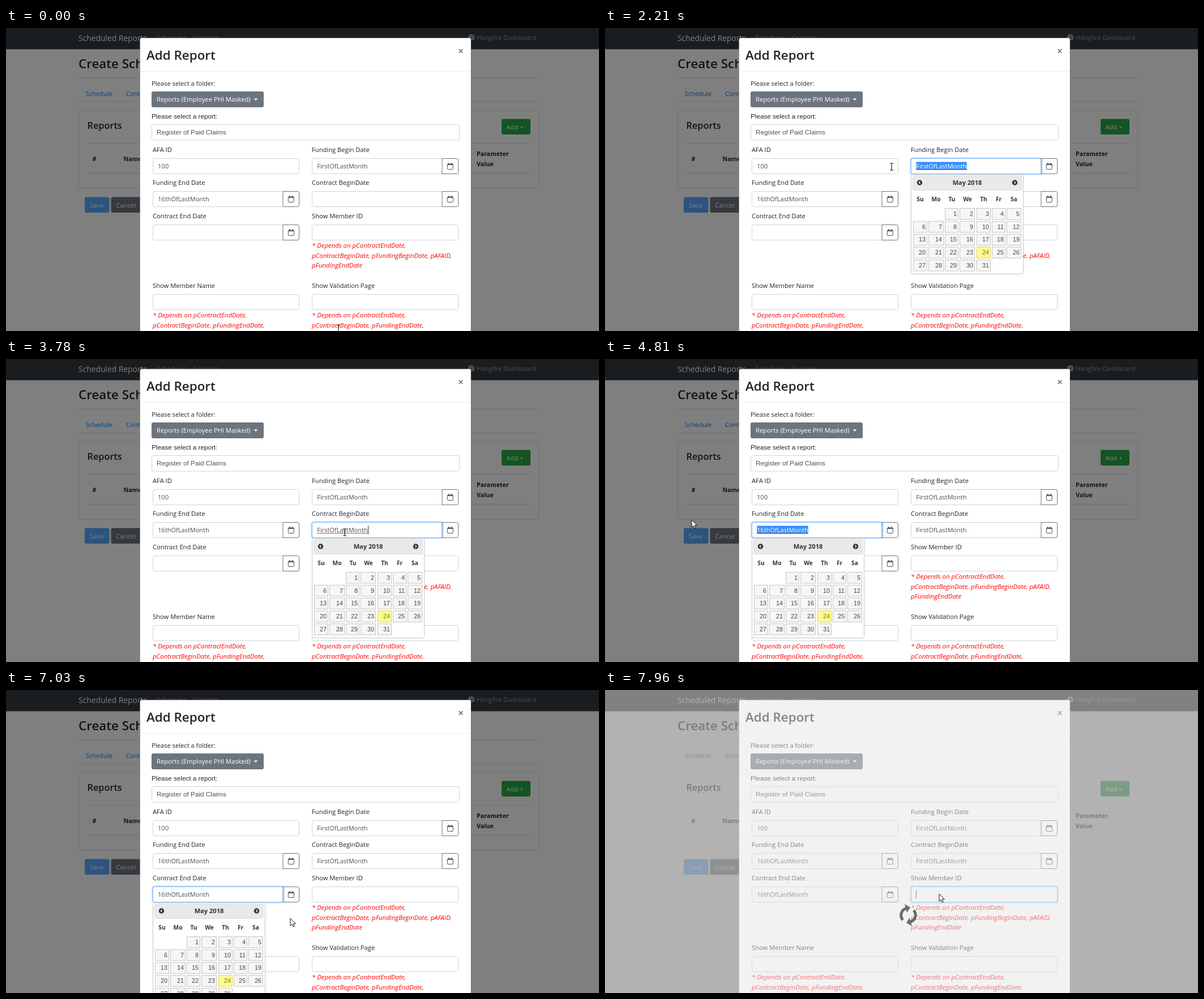
An HTML page for the animation above (8000 ms loop, 1047 px wide and 535 px high).

```html
<!DOCTYPE html>
<html lang="en">
<head>
<meta charset="utf-8">
<title>Add Report</title>
<style>
  html, body { margin: 0; width: 100%; height: 100%; overflow: hidden; background: #808080; }
  svg { display: block; }
  text { font-family: "Open Sans", "Noto Sans", sans-serif; white-space: pre; }
  .arial { font-family: "Liberation Sans", Arial, sans-serif; }
</style>
</head>
<body>
<svg id="stage" width="1047" height="535" viewBox="0 0 1047 535" xmlns="http://www.w3.org/2000/svg"></svg>
<script>
const LOOP = 8000;
const stage = document.getElementById('stage');

// ---- markup helpers ----
const rect = (x, y, w, h, fill, stroke = 'none', r = 0, extra = '') =>
  `<rect x="${x}" y="${y}" width="${w}" height="${h}" rx="${r}" fill="${fill}" stroke="${stroke}" ${extra}/>`;
const text = (x, y, size, fill, content, extra = '') =>
  `<text x="${x}" y="${y}" font-size="${size}" fill="${fill}" ${extra}>${content}</text>`;
const hline = (x1, x2, y, color, width = 1) =>
  `<path d="M${x1} ${y}H${x2}" stroke="${color}" stroke-width="${width}"/>`;
const BOLD = 'font-weight="700"', SEMI = 'font-weight="600"', MIDDLE = 'text-anchor="middle"';
const INK = '#212529', FIELD_INK = '#495057';

// ---- form fields ----
const fields = {
  afa: { x: 259, y: 230, label: 'AFA ID', value: '100' },
  fundBegin: { x: 540, y: 230, label: 'Funding Begin Date', value: 'FirstOfLastMonth', date: true },
  fundEnd: { x: 259, y: 288, label: 'Funding End Date', value: '16thOfLastMonth', date: true },
  contractBegin: { x: 540, y: 288, label: 'Contract BeginDate', value: 'FirstOfLastMonth', date: true, pasteAt: 3780 },
  contractEnd: { x: 259, y: 347, label: 'Contract End Date', value: '16thOfLastMonth', date: true, pasteAt: 6680 },
  memberId: { x: 540, y: 347, label: 'Show Member ID' },
  memberName: { x: 259, y: 470, label: 'Show Member Name' },
  validation: { x: 540, y: 470, label: 'Show Validation Page' }
};
const inputWidth = f => f.date ? 230 : 258;

const calendarIcon = (x, y) =>
  `<g transform="translate(${x} ${y})" fill="none" stroke="${FIELD_INK}">` +
  rect(-5, -4, 10, 9.5, 'none', FIELD_INK, 1) +
  `<path d="M-5 -2.7H5" stroke-width="1.4"/><path d="M-2.5 -6V-3M2.5 -6V-3" stroke-width="1.5"/></g>`;

const fieldMarkup = ([id, f]) =>
  text(f.x, f.y - 11, 11.2, INK, f.label) +
  rect(f.x + .5, f.y + .5, 258, 27, '#fff', '#ced4da', 3) +
  (f.date
    ? `<path d="M${f.x + 230} ${f.y + .5}h25.5a3 3 0 0 1 3 3v21a3 3 0 0 1 -3 3h-25.5z" fill="#fff" stroke="#6c757d"/>` +
      calendarIcon(f.x + 244.3, f.y + 14)
    : '') +
  (f.value ? text(f.x + 9.3, f.y + 17.8, 11, FIELD_INK, f.value, `id="${id}"`) : '');

const note = (x, y, ...lines) => lines.map((line, i) =>
  text(x, y + i * 17.5, 11.4, '#f00', line, 'font-style="italic"')).join('');

// ---- page behind the dialog ----
const page =
  rect(0, 0, 1047, 535, '#fff') + rect(0, 0, 1047, 37.5, '#343a40') +
  text(128, 22.5, 13.85, '#fff', 'Scheduled Reports') +
  text(266, 21, 11.2, '#9a9da0', 'Schedules') + text(330, 21, 11.2, '#9a9da0', 'Contacts') +
  '<path d="M817.5 21.5a6 6 0 1 1 8 0z" fill="#9a9da0"/><path d="M821.5 19.5l2 -5" stroke="#343a40"/>' +
  text(831, 21, 11.2, '#9a9da0', 'Hangfire Dashboard') +
  text(128, 71, 22.4, INK, 'Create Schedule', SEMI) +
  hline(128, 941, 88, '#e2e2e2') + hline(128, 941, 130, '#dee2e6') +
  text(140.5, 119.5, 11.2, '#007bff', 'Schedule') + text(212, 119.5, 11.2, '#007bff', 'Contacts') +
  rect(128.5, 146, 812.5, 137, '#fff', '#dfdfdf', 3) +
  text(143.5, 178, 16.3, INK, 'Reports', SEMI) +
  rect(875, 160.5, 51, 27.5, '#28a745', 'none', 3) + text(883.5, 178.5, 11.2, '#fff', 'Add +') +
  hline(144, 926, 203.5, '#dee2e6') + hline(144, 926, 256.5, '#dee2e6', 1.5) +
  text(152.5, 234.5, 10.7, INK, '#', BOLD) + text(207.5, 234.5, 10.7, INK, 'Name', BOLD) +
  text(831, 226, 10.7, INK, 'Parameter', BOLD) + text(831, 243.5, 10.7, INK, 'Value', BOLD) +
  rect(139, 298.5, 43.5, 27.5, '#59a9ff', 'none', 3) + text(148, 316.5, 11.2, '#fff', 'Save') +
  rect(185.5, 298.5, 54, 27.5, '#6c757d', 'none', 3) + text(194.5, 316.5, 11.2, '#fff', 'Cancel') +
  rect(0, 0, 1047, 535, '#000', 'none', 0, 'opacity=".5"');

// ---- dialog ----
const dialog =
  rect(236.5, 17.5, 584.5, 560, '#fff', 'rgba(0,0,0,.2)', 3) +
  text(248, 56, 22.4, INK, 'Add Report', SEMI) +
  text(803, 46.5, 17.5, '#7f7f7f', '×', `${MIDDLE} ${BOLD}`) +
  hline(237, 821, 76.5, '#e9ecef') +
  text(257, 102, 11.2, INK, 'Please select a folder:') +
  rect(257, 112, 198, 28, '#6c757d', 'none', 3) +
  text(266, 130, 11.2, '#fff', 'Reports (Employee PHI Masked)') +
  '<path d="M437.5 124.5h7l-3.5 3.5z" fill="#fff"/>' +
  text(257, 160, 11.7, INK, 'Please select a report:', 'class="arial"') +
  rect(257.5, 170.5, 543, 27.5, '#fff', '#ced4da', 3) +
  text(266, 188.3, 11.75, FIELD_INK, 'Register of Paid Claims', 'class="arial"') +
  Object.entries(fields).map(fieldMarkup).join('') +
  note(540, 388, '* Depends on pContractEndDate,', 'pContractBeginDate, pFundingBeginDate, pAFAID,', 'pFundingEndDate') +
  [259, 540].map(x => note(x, 511, '* Depends on pContractEndDate,', 'pContractBeginDate, pFundingEndDate,')).join('');

// ---- date picker, drawn from its own corner ----
const colX = [3, 30, 59, 85, 115, 142, 168];
const colW = [25, 27, 24, 27, 25, 24, 26];

function dayCell(day) {
  const slot = day + 1, col = slot % 7, y = 60.5 + Math.floor(slot / 7) * 22.75;
  const today = day === 24;
  return rect(colX[col] + .5, y, colW[col] - 1, 19.5, today ? '#fffa90' : '#f6f6f6', today ? '#dad55e' : '#c5c5c5') +
    text(colX[col] + colW[col] - 3, y + 13.3, 10.8, today ? '#777620' : '#454545', day, 'class="arial" text-anchor="end"');
}
const arrowButton = (x, dir) =>
  `<circle cx="${x}" cy="15" r="4.7" fill="#333"/>` +
  `<path d="M${x - dir} 12.8l${dir * 2.2} 2.2l${-dir * 2.2} 2.2" fill="none" stroke="#fff" stroke-width="1.3"/>`;
const picker =
  rect(-.5, .5, 198, 176, '#fff', '#c5c5c5', 3) +
  rect(2.5, 2.5, 192, 26, '#e9e9e9', '#ddd', 3) +
  arrowButton(14.5, -1) + arrowButton(182.5, 1) +
  text(98.5, 19, 11.1, '#333', 'May 2018', `${MIDDLE} ${BOLD}`) +
  ['Su', 'Mo', 'Tu', 'We', 'Th', 'Fr', 'Sa'].map((name, i) =>
    text([15.5, 43.5, 71.5, 99, 127.5, 154, 181][i], 48, 10.2, '#333', name, `${MIDDLE} ${BOLD}`)).join('') +
  Array.from({ length: 31 }, (_, i) => dayCell(i + 1)).join('');

const spinnerArm = '<path d="M-9.5 8.5A12.5 12.5 0 0 1 -4 -11.8" fill="none" stroke="#555" stroke-width="5"/>' +
  '<path d="M-6.5 -19.5L3.5 -13.5L-2.5 -4.5z" fill="#555"/>';

stage.innerHTML = page + dialog + `
  <g id="focus">
    <rect id="glow" height="29.3" rx="4" fill="none" stroke="#007bff" stroke-opacity=".25" stroke-width="2.3"/>
    <rect id="edge" height="27" rx="3" fill="none" stroke="#80bdff"/>
  </g>
  <path id="squiggle" fill="none" stroke="#e22" stroke-width=".8"/>
  <g id="selection">
    <clipPath id="selClip"><rect id="selArea" height="14"/></clipPath>
    <g clip-path="url(#selClip)">${rect(0, 0, 1047, 535, '#3390ff')}${text(0, 0, 11, '#fff', '', 'id="selText"')}
      <path id="selSquiggle" fill="none" stroke="#c0325a" stroke-width="1"/></g>
  </g>
  <path id="caret" stroke="#333"/>
  <g id="picker">${picker}</g>
  <g id="veil">${rect(0, 0, 1047, 535, '#e6e6e6')}</g>
  <g id="spinner"><g id="arms">${spinnerArm}<g transform="rotate(180)">${spinnerArm}</g></g></g>
  <path id="arrow" d="M0 0V13.2L3 10.4L5.1 15L7.2 14.1L5.2 9.6H9.3Z" fill="#fff" stroke="#000" stroke-width=".9"/>
  <path id="beam" d="M-3 -6H-.8L0 -5.4L.8 -6H3M0 -5.4V5.4M-3 6H-.8L0 5.4L.8 6H3" fill="none" stroke="#111" stroke-width="1.1"/>`;

const el = id => document.getElementById(id);
const set = (id, attrs) => { for (const k in attrs) el(id).setAttribute(k, attrs[k]); };
const show = (id, on) => { el(id).style.display = on ? '' : 'none'; };

// ---- timeline ----
const pointer = [
  [0, 587, 531], [220, 587, 531], [1010, 670, 245], [1190, 670, 245], [1460, 506, 245],
  [2210, 506, 245], [2500, 496, 263], [2620, 496, 263], [2990, 525, 268],
  [3040, 525, 268], [3380, 598, 306], [3780, 598, 306], [4150, 525, 330], [4580, 364, 302],
  [4610, 364, 302], [4810, 153, 284], [4960, 153, 284], [5400, 588, 321], [5750, 480, 328],
  [5800, 480, 328], [6210, 449, 366], [6680, 449, 366], [7030, 502, 403], [7110, 502, 403],
  [7360, 590, 360], [LOOP, 590, 360]
];
const sessions = [
  { id: 'fundBegin', from: 1190, to: 2600, drag: true, spell: true },
  { id: 'contractBegin', from: 3390, to: 4150, spell: true, caretUntil: 4150 },
  { id: 'fundEnd', from: 4610, to: 5430, drag: true, spell: true },
  { id: 'contractEnd', from: 6210, to: 7110, caretUntil: 6980 },
  { id: 'memberId', from: 7680, to: 9000, caretUntil: 9000 }
];
const FADE = 200;

const clamp = v => Math.min(1, Math.max(0, v));
const swing = p => (1 - Math.cos(Math.PI * clamp(p))) / 2;

function pointerAt(t) {
  const i = pointer.findIndex(k => k[0] > t);
  const [t0, x0, y0] = pointer[i - 1], [t1, x1, y1] = pointer[i];
  const p = swing((t - t0) / (t1 - t0));
  return { x: x0 + (x1 - x0) * p, y: y0 + (y1 - y0) * p };
}

const inside = (p, x, y, w, h) => p.x >= x && p.x <= x + w && p.y >= y && p.y <= y + h;
const overText = p => inside(p, 540, 500, 255, 35) ||
  Object.values(fields).some(f => inside(p, f.x, f.y, inputWidth(f), 28));

const wave = (x, y, width) => `M${x} ${y}` + 'l1 -1.4l1 1.4'.repeat(Math.round(width / 2));

function drawFocus(t, mouse) {
  const s = sessions.find(s => t >= s.from && t < s.to + FADE);
  for (const id of ['focus', 'picker', 'squiggle', 'selection', 'caret']) show(id, s);
  if (!s) return;

  const f = fields[s.id], w = inputWidth(f), active = t < s.to;
  set('focus', { opacity: swing((t - s.from) / 150) * (1 - swing((t - s.to) / 150)) });
  set('edge', { x: f.x + .5, y: f.y + .5, width: w });
  set('glow', { x: f.x - .65, y: f.y - .65, width: w + 2.3 });

  show('picker', f.date);
  set('picker', {
    transform: `translate(${f.x + 1} ${f.y + 28})`,
    opacity: swing((t - s.from) / FADE) * (1 - swing((t - s.to) / FADE))
  });

  const filled = f.value && t >= (f.pasteAt || 0);
  const left = f.x + 9.3, base = f.y + 17.8;
  const right = left + (filled ? el(s.id).getComputedTextLength() : 0);
  const zigzag = wave(left, base + 2.6, right - left);

  show('squiggle', active && s.spell && filled);
  set('squiggle', { d: zigzag });

  show('selection', active && s.drag);
  if (s.drag) {
    const dragged = t < s.from + 400 ? mouse.x : left;
    const start = Math.min(right, Math.max(left, dragged));
    set('selArea', { x: start, y: f.y + 6.5, width: right - start });
    set('selText', { x: left, y: base });
    el('selText').textContent = f.value;
    set('selSquiggle', { d: zigzag });
  }

  show('caret', t < (s.caretUntil || 0));
  set('caret', { d: `M${Math.round(right) + .5} ${f.y + 6.5}v15` });
}

function render(t) {
  const mouse = pointerAt(t);
  for (const id in fields) if (fields[id].pasteAt) show(id, t >= fields[id].pasteAt);
  drawFocus(t, mouse);

  const loading = swing((t - 7670) / 290);
  set('veil', { opacity: loading * .5 });
  set('spinner', { transform: 'translate(535.5 397.5)', opacity: loading * .85 });
  set('arms', { transform: `rotate(${(t - 7960) * .18})` });

  const beam = overText(mouse) && t < 7690;
  show('beam', beam);
  show('arrow', !beam);
  set(beam ? 'beam' : 'arrow', { transform: `translate(${mouse.x} ${mouse.y})` });
}

const began = performance.now();
function tick() {
  render((performance.now() - began) % LOOP);
  requestAnimationFrame(tick);
}
tick();
</script>
</body>
</html>
```
